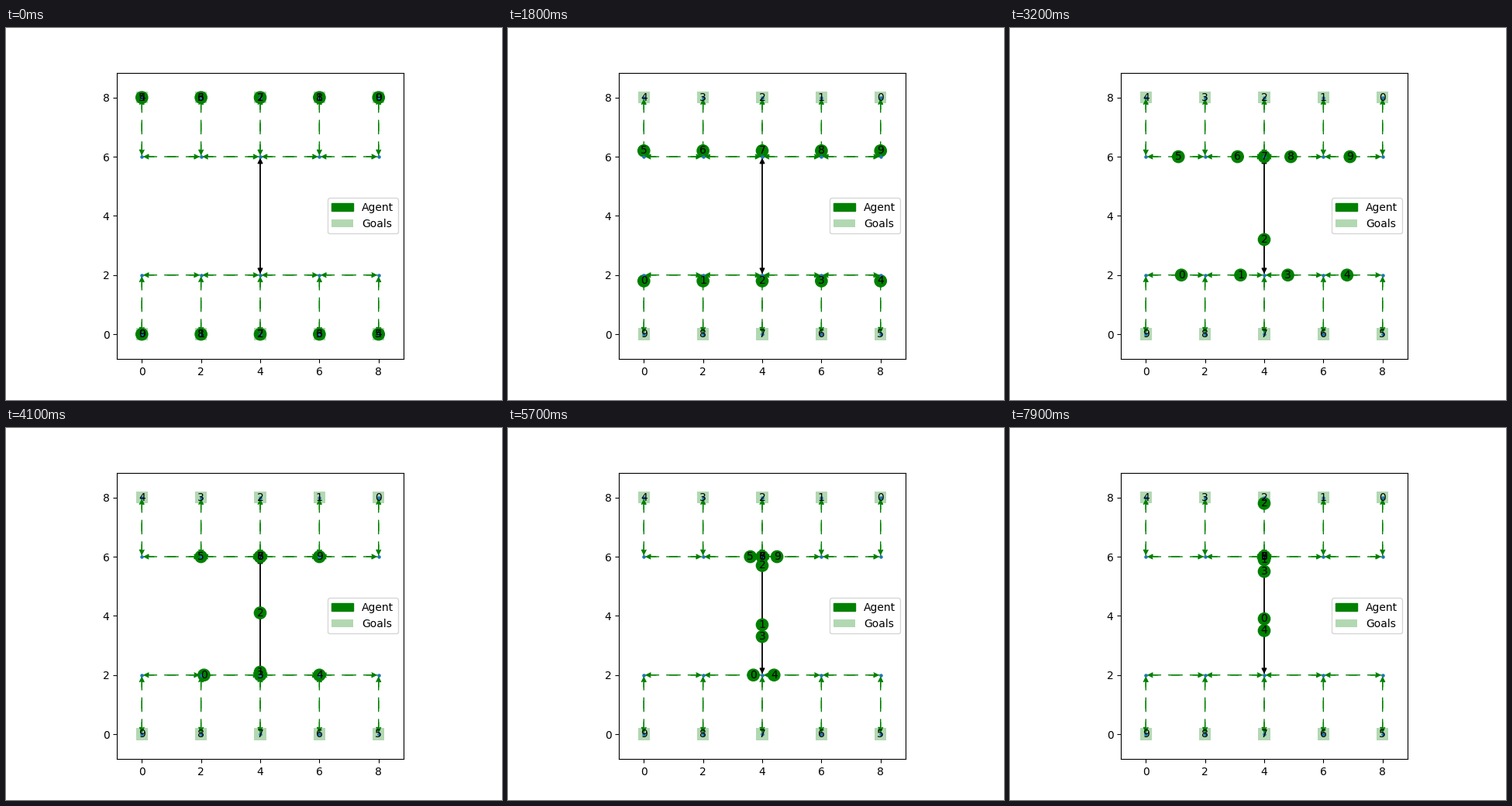
Animation of 640x480 px, one loop 8 s. Source, as a matplotlib script:

```python
import matplotlib.pyplot as plt
import numpy as np
from matplotlib.animation import FuncAnimation
from matplotlib.patches import Circle, FancyArrowPatch, Patch, Rectangle

FRAMES, INTERVAL = 80, 100
SPEED = 0.1  # units per step
RADIUS = 0.2
NODE_SIZE = 5
LOOSE = (0, (10, 10))

# Steps an agent waits at a junction before moving on
WAITS = {
    2: {(4, 6): 1},
    3: {(4, 2): 4},
    4: {(6, 2): 1, (4, 2): 3},
    5: {(0, 6): 1},
    6: {(2, 6): 1},
    8: {(6, 6): 1},
    9: {(8, 6): 1, (6, 6): 1},
}


def route(i):
    """Junctions visited by agent i, from its start to the corridor's far end."""
    x = 2 * (i % 5)
    y0, y1 = (0, 2) if i < 5 else (8, 6)
    step = 2 if x < 4 else -2
    row = [(k, y1) for k in range(x, 4, step)] if x != 4 else []
    path = [(x, y0), *row, (4, y1)]
    return path + [(4, 6), (4, 8)] if i < 5 else path


def schedule(i):
    """Times and points between which agent i moves at constant speed."""
    path = route(i)
    times, points, t = [0], [path[0]], 0
    for a, b in zip(path, path[1:]):
        t += (abs(b[0] - a[0]) + abs(b[1] - a[1])) / SPEED
        times.append(t)
        points.append(b)
        wait = WAITS.get(i, {}).get(b, 0)
        if wait:
            t += wait
            times.append(t)
            points.append(b)
    return times, np.array(points)


def label(x, y, s):
    return ax.text(x, y, s, ha="center", va="center", color="black")


def edge(a, b, color, style):
    shrink = np.sqrt(NODE_SIZE) / 2
    for start, end in ((a, b), (b, a)):
        ax.add_patch(FancyArrowPatch(
            start, end, arrowstyle="-|>", mutation_scale=10, color=color,
            lw=1, linestyle=style, shrinkA=shrink, shrinkB=shrink, zorder=1))


fig, ax = plt.subplots(figsize=(6.4, 4.8), dpi=100)
ax.set_aspect("equal")
ax.set(xlim=(-0.84, 8.84), ylim=(-0.84, 8.84))
ax.set_xticks(range(0, 9, 2))
ax.set_yticks(range(0, 9, 2))

# Graph
cols = range(0, 9, 2)
for near, far in ((2, 0), (6, 8)):
    for x in cols:
        edge((x, far), (x, near), "green", LOOSE)
        if x < 8:
            edge((x, near), (x + 2, near), "green", LOOSE)
edge((4, 2), (4, 6), "black", "solid")
nodes = np.array([(x, y) for y in (0, 2, 6, 8) for x in cols])
ax.scatter(nodes[:, 0], nodes[:, 1], s=NODE_SIZE, c="tab:blue", zorder=2)

# Goals mirror the starting places
for i in range(10):
    x, y = 8 - 2 * (i % 5), 8 if i < 5 else 0
    ax.add_patch(Rectangle((x - RADIUS, y - RADIUS), 2 * RADIUS, 2 * RADIUS,
                           facecolor="green", alpha=0.3))
    label(x, y, str(i))

plans = [schedule(i) for i in range(10)]
discs, tags = [], []
for i, (_, points) in enumerate(plans):
    discs.append(ax.add_patch(Circle(points[0], RADIUS, color="green")))
    tags.append(label(*points[0], str(i)))

ax.legend(handles=[Patch(color="green", label="Agent"),
                   Patch(facecolor="green", alpha=0.3, label="Goals")],
          loc="center right")


def update(frame):
    for (times, points), disc, tag in zip(plans, discs, tags):
        pos = [np.interp(frame, times, points[:, k]) for k in (0, 1)]
        disc.center = pos
        tag.set_position(pos)
    return discs + tags


anim = FuncAnimation(fig, update, frames=FRAMES, interval=INTERVAL,
                     repeat=True, repeat_delay=0)
plt.show()
```
